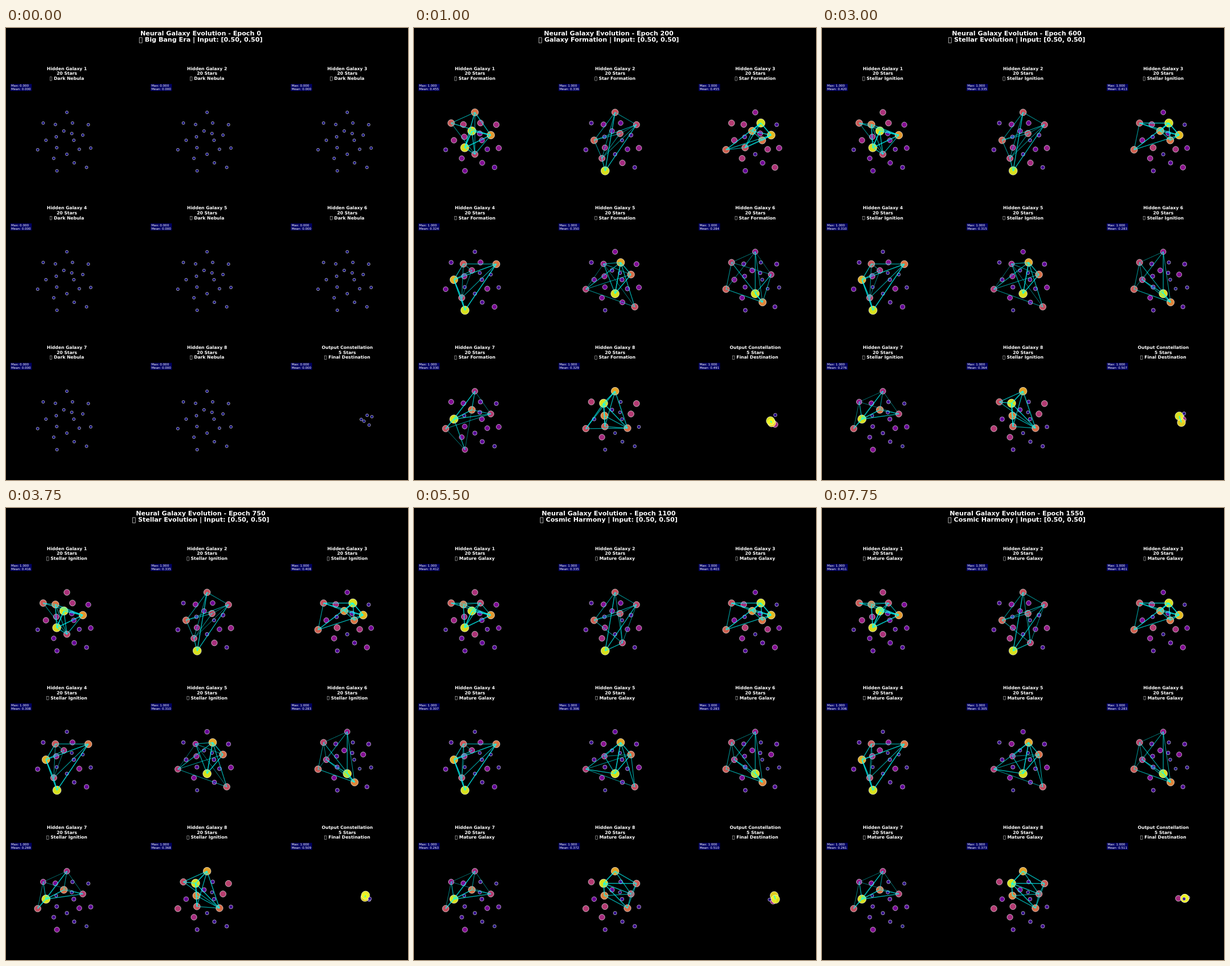
Animation of 706 by 793 pixels, one loop 8 s. Source, as an HTML page with a canvas:

```html
<!DOCTYPE html>
<html lang="en">
<head>
<meta charset="utf-8">
<title>Neural Galaxy Evolution</title>
<style>
html, body { margin: 0; width: 100%; height: 100%; overflow: hidden; background: #000; }
canvas { display: block; }
</style>
</head>
<body>
<canvas id="sky" width="706" height="793"></canvas>
<script>
const ctx = document.getElementById('sky').getContext('2d');
const STEP = 250, STEPS = 32;
const DX = 246.2, DY = 244.6;
const FONT = '"DejaVu Sans", Verdana, sans-serif';

const PLASMA = ['0d0887', '41049d', '6a00a8', '8f0da4', 'b12a90', 'cc4778',
  'e16462', 'f2844b', 'fca636', 'fcce25', 'f0f921']
  .map(h => [0, 2, 4].map(i => parseInt(h.slice(i, i + 2), 16)));

const ERAS = [
  [100, 'Big Bang Era', 'Dark Nebula'],
  [500, 'Galaxy Formation', 'Star Formation'],
  [1000, 'Stellar Evolution', 'Stellar Ignition'],
  [Infinity, 'Cosmic Harmony', 'Mature Galaxy']
];

// Hidden stars lie on a spiral of three turns.
const SPIRAL = Array.from({ length: 20 }, (_, i) => {
  const r = 12.25 + 2.45 * i, a = i * 0.3 * Math.PI;
  return [106.9 + r * Math.cos(a), 197 - r * Math.sin(a)];
});

// mean: first and last; range: second and sixth level;
// order: brightest stars first; swaps: [leaving, arriving, seconds].
const GALAXIES = [
  { mean: [.455, .411], range: [.98, .52], order: [2, 4, 7, 9, 16, 8, 10, 3], swaps: [[15, 9, 1.5], [5, 8, 5.2]] },
  { mean: [.336, .335], range: [.62, .49], order: [18, 10, 15, 1, 14, 12, 13, 4], swaps: [[11, 12, 4]] },
  { mean: [.455, .401], range: [.9, .57], order: [8, 7, 2, 0, 17, 16, 6, 9], swaps: [[4, 16, 2.5]] },
  { mean: [.324, .306], range: [.87, .42], order: [18, 10, 14, 9, 11, 3, 8, 6], swaps: [[2, 3, 5.5]] },
  { mean: [.350, .305], range: [.85, .38], order: [5, 8, 7, 19, 17, 3, 11, 13], swaps: [[9, 3, 4]] },
  { mean: [.284, .283], range: [.75, .36], order: [5, 12, 17, 16, 10, 15, 11, 2], swaps: [[7, 10, 1.5]] },
  { mean: [.330, .261], range: [.68, .36], order: [10, 2, 17, 7, 15, 16, 6, 9], swaps: [[18, 16, 2.5]] },
  { mean: [.329, .373], range: [.84, .56], order: [9, 15, 3, 6, 14, 7, 11], swaps: [[17, 16, 1.5], [16, 7, 4], [4, 14, 4]] }
];
const OUTPUT = { mean: [.491, .511], levels: [.05, .42, .95, 1, .05] };

const mix = (a, b, k) => a + (b - a) * k;

function random(n) {
  const s = Math.sin(n * 127.1 + 11.7) * 43758.5453;
  return s - Math.floor(s);
}

function meanAt([first, last], t) {
  return t ? mix(last, first, Math.exp(-Math.max(0, t - 1) / 1.3)) : 0;
}

function rankLevel(k, [second, sixth]) {
  if (k === 0) return 1;
  return k < 6 ? mix(second, sixth, ((k - 1) / 4) ** 0.7) : sixth * 0.75;
}

// Ranked stars glow by place; the others share what the mean leaves over.
function levelsAt(g, seed, t) {
  const rest = g.range[1] * 0.85;
  const ranked = {};
  g.order.forEach((star, k) => ranked[star] = { level: rankLevel(k, g.range), weight: 1 });
  for (const [leaving, arriving, when] of [...g.swaps].reverse()) {
    const late = 1 / (1 + Math.exp((when - t) * 6));
    const slot = ranked[arriving];
    ranked[leaving] = { level: slot.level, weight: slot.weight * (1 - late) };
    slot.weight *= late;
  }
  const levels = SPIRAL.map((_, i) => {
    const s = ranked[i];
    return s && (s.level < rest ? s.level : mix(rest, s.level, s.weight));
  });
  const shares = levels.map((v, i) => v === undefined ? 0.1 + 0.9 * random(seed * 20 + i) : 0);
  const sum = list => list.reduce((a, b) => a + (b || 0), 0);
  const unit = Math.max(0.4, 20 * meanAt(g.mean, t) - sum(levels)) / sum(shares);
  return levels.map((v, i) => v === undefined ? Math.min(shares[i] * unit, rest * 0.94) : v);
}

// Output stars jump to a new scatter at every step.
function outputStars(step) {
  return OUTPUT.levels.map((v, i) => {
    const n = step * 10 + i;
    const spread = k => random(n + k) + random(n + k + 500) - 1;
    return [633 + 11 * spread(0), 686 + 12 * spread(1000), step ? v : 0];
  });
}

function color(v) {
  const x = Math.min(v, 1) * 10, i = Math.min(9, Math.floor(x));
  return 'rgb(' + PLASMA[i].map((c, k) => Math.round(mix(c, PLASMA[i + 1][k], x - i))) + ')';
}

// Centred bold line; a hollow box may stand before the text.
function heading(text, x, y, size, boxed) {
  ctx.font = `bold ${size}px ${FONT}`;
  ctx.fillStyle = '#fff';
  const lead = boxed ? size * 0.6 : 0;
  if (boxed) text = ' ' + text;
  const left = x - (ctx.measureText(text).width + lead) / 2;
  if (boxed) {
    ctx.strokeStyle = '#fff';
    ctx.lineWidth = size * 0.06;
    ctx.strokeRect(left + size * 0.08, y - size * 0.68, size * 0.44, size * 0.83);
  }
  ctx.fillText(text, left + lead, y);
}

function drawStars(stars) {
  ctx.globalAlpha = 0.9;
  ctx.strokeStyle = '#fff';
  ctx.lineWidth = 0.7;
  for (const [x, y, v] of stars) {
    ctx.beginPath();
    ctx.arc(x, y, 2.46 * Math.sqrt(1 + 8 * v), 0, 2 * Math.PI);
    ctx.fillStyle = color(v);
    ctx.fill();
    ctx.stroke();
  }
  ctx.globalAlpha = 1;
}

// The brightest 30% are joined, each to the next three in order.
function drawLinks(stars) {
  const count = Math.ceil(stars.length * 0.3);
  const limit = stars.map(s => s[2]).sort((a, b) => b - a)[count - 1];
  const top = stars.filter(s => s[2] >= limit);
  ctx.strokeStyle = '#0ff';
  top.forEach((a, i) => top.slice(i + 1, i + 4).forEach(b => {
    const s = (a[2] + b[2]) / 2;
    ctx.globalAlpha = 0.3 + 0.5 * s;
    ctx.lineWidth = 0.2 + 1.6 * s;
    ctx.beginPath();
    ctx.moveTo(a[0], a[1]);
    ctx.lineTo(b[0], b[1]);
    ctx.stroke();
  }));
  ctx.globalAlpha = 1;
}

function drawInfo(x, y, mean, active) {
  ctx.fillStyle = '#000061';
  ctx.fillRect(x + 7.3, y + 98, 38.1, 12.7);
  ctx.strokeStyle = 'rgba(0, 0, 0, .7)';
  ctx.lineWidth = 0.7;
  ctx.strokeRect(x + 7.3, y + 98, 38.1, 12.7);
  ctx.fillStyle = '#fff';
  ctx.font = `5.56px ${FONT}`;
  ctx.fillText('Max: ' + (active ? '1.000' : '0.000'), x + 9, y + 103.1);
  ctx.fillText('Mean: ' + mean.toFixed(3), x + 9, y + 109.2);
}

function drawPanel(x, y, lines, mean, stars, active) {
  lines.forEach((text, n) => heading(text, x + 106.9, y + 73.8 + n * 8.6, 7.64, n === 2));
  drawStars(stars);
  if (active) drawLinks(stars);
  drawInfo(x, y, mean, active);
}

function draw(step) {
  const t = step * STEP / 1000, epoch = step * 50, active = step > 0;
  const [, era, phase] = ERAS.find(e => epoch < e[0]);
  ctx.fillStyle = '#000';
  ctx.fillRect(0, 0, 706, 793);
  heading('Neural Galaxy Evolution - Epoch ' + epoch, 341.9, 13.2, 11.11);
  heading(era + ' | Input: [0.50, 0.50]', 341.9, 24.4, 11.11, true);
  GALAXIES.forEach((g, i) => {
    const dx = i % 3 * DX, dy = Math.floor(i / 3) * DY;
    const levels = levelsAt(g, i, t);
    const stars = SPIRAL.map(([x, y], n) => [x + dx, y + dy, active ? levels[n] : 0]);
    drawPanel(dx, dy, ['Hidden Galaxy ' + (i + 1), '20 Stars', phase], meanAt(g.mean, t), stars, active);
  });
  drawPanel(2 * DX, 2 * DY, ['Output Constellation', '5 Stars', 'Final Destination'],
    meanAt(OUTPUT.mean, t), outputStars(step), active);
}

const begin = performance.now();
let shown = -1;
function tick() {
  const step = Math.floor((performance.now() - begin) / STEP) % STEPS;
  if (step !== shown) draw(shown = step);
  requestAnimationFrame(tick);
}
tick();
</script>
</body>
</html>
```
